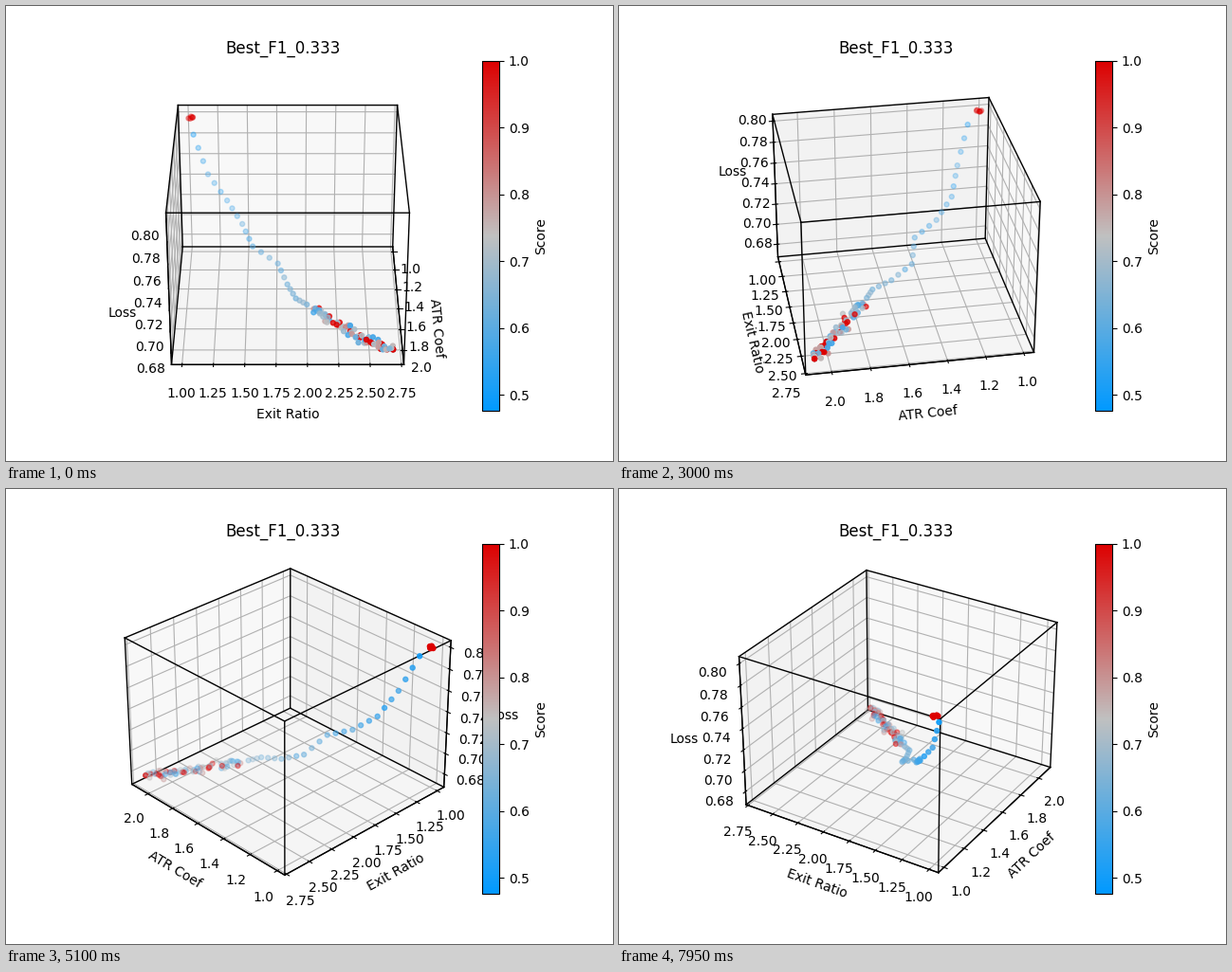
Write a matplotlib script that moves like this. It is 640 by 480 pixels and loops after 8 s.

```python
from itertools import combinations, product

import matplotlib.pyplot as plt
import numpy as np
from matplotlib.animation import FuncAnimation
from matplotlib.colors import LinearSegmentedColormap

TICK_MS = 50
TICKS_PER_STEP = 3
LOOP_MS = 8000
DEGREES_PER_STEP = 4

# Lowest and highest ATR coefficient, exit ratio and loss
DATA_MIN = np.array([1.0, 1.0, 0.6735])
DATA_MAX = np.array([2.08, 2.685, 0.8])
MARGIN = 0.05 * (DATA_MAX - DATA_MIN)
LIMITS = list(zip(DATA_MIN - MARGIN, DATA_MAX + MARGIN))

# The descent runs through these points: ATR coefficient, exit ratio, loss
PATH = np.array([
    (1.00, 1.00, 0.800), (1.08, 1.05, 0.789), (1.15, 1.17, 0.757),
    (1.20, 1.33, 0.736), (1.30, 1.46, 0.722), (1.43, 1.55, 0.712),
    (1.47, 1.76, 0.699), (1.59, 1.84, 0.690), (1.70, 1.91, 0.687),
    (1.74, 2.00, 0.685), (1.93, 2.35, 0.677), (2.08, 2.67, 0.676),
])
DOTS_PER_LEG = 3
TAIL_START, TAIL_END = 9.2, 11
CLUMPS, CLUMP_SIZE = 12, 6


def along_path(position):
    legs = np.arange(len(PATH))
    return np.column_stack([np.interp(position, legs, axis) for axis in PATH.T])


def make_points():
    rng = np.random.default_rng(4)

    start = PATH[0] + rng.random((6, 3)) * (0.03, 0.045, 0)
    start_score = np.ones(len(start))

    trail = along_path(np.arange(1, TAIL_START, 1 / DOTS_PER_LEG))
    trail_score = np.linspace(0.5, 0.64, len(trail))
    trail_score += rng.uniform(-0.01, 0.06, len(trail))

    centres = np.repeat(np.linspace(TAIL_START, TAIL_END, CLUMPS), CLUMP_SIZE)
    tail = along_path(centres)
    tail += rng.normal(size=tail.shape) * (0.018, 0.022, 0.0013)
    is_best = rng.random(len(tail)) < 0.35
    tail_score = np.where(is_best, 1.0, rng.uniform(0.56, 0.82, len(tail)))

    places = np.clip(np.vstack([start, trail, tail]), DATA_MIN, DATA_MAX)
    return places, np.concatenate([start_score, trail_score, tail_score])


def draw_box(ax):
    for start, end in combinations(product(*LIMITS), 2):
        if sum(a != b for a, b in zip(start, end)) == 1:
            ax.plot(*zip(start, end), color="black", lw=1, snap=False)


fig = plt.figure(figsize=(6.4, 4.8), dpi=100)
ax = fig.add_subplot(projection="3d")
cmap = LinearSegmentedColormap.from_list(
    "score", ["#0099ff", "#c0c0c0", "#dd0000"])

places, scores = make_points()
dots = ax.scatter(*places.T, c=scores, cmap=cmap, vmin=0.476, vmax=1.0, s=13)
draw_box(ax)
ax.set(xlim=LIMITS[0], ylim=LIMITS[1], zlim=LIMITS[2], title="Best_F1_0.333",
       xlabel="ATR Coef", ylabel="Exit Ratio", zlabel="Loss")
fig.colorbar(dots, label="Score")


def update(tick):
    ax.view_init(elev=30, azim=tick // TICKS_PER_STEP * DEGREES_PER_STEP)
    return ()


anim = FuncAnimation(fig, update, frames=LOOP_MS // TICK_MS,
                     interval=TICK_MS, repeat=True, repeat_delay=0)
plt.show()
```
